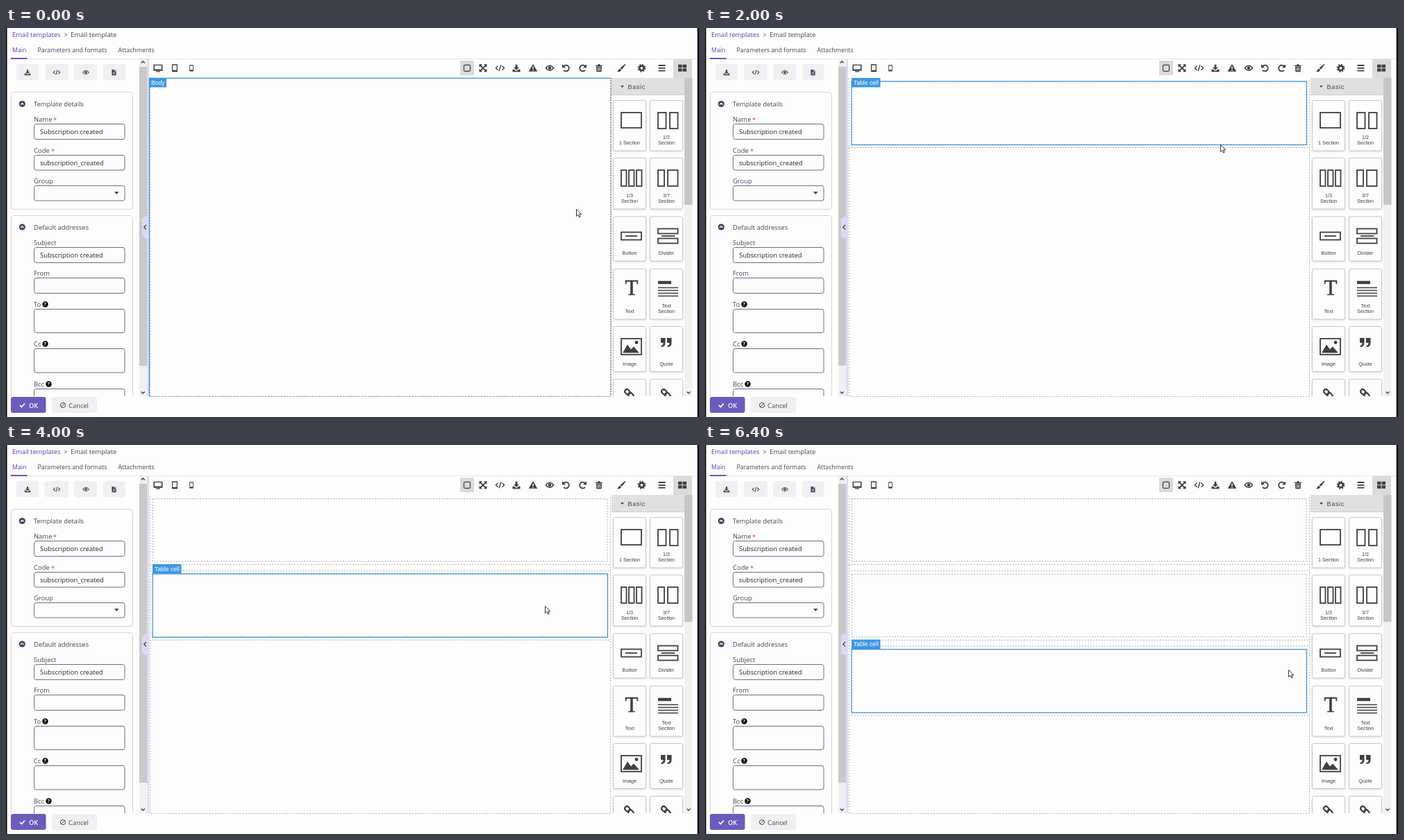
Write an HTML page that moves like this. It is 998x561 px and loops after 8000 ms.

```html
<!DOCTYPE html>
<html lang="en">
<head>
<meta charset="utf-8">
<title>Email template editor</title>
<style>
  html, body { margin: 0; width: 100%; height: 100%; overflow: hidden; background: #fdfdfd; }
  svg { display: block; width: 998px; height: 561px; }
  text { font: 9.45px "Open Sans", sans-serif; fill: #41465c; }
  .tab { font-size: 8.8px; }
  .purple { fill: #5a3fae; }
  .val { fill: #20243a; }
  .req { fill: #d8432f; }
  .btn { font-size: 9.2px; font-weight: 600; }
  .tag text { font: 8.6px "Liberation Sans", Arial, sans-serif; fill: #fff; }
  .basic { font: 9px "Liberation Sans", Arial, sans-serif; letter-spacing: .7px; fill: #444; }
  .block text { font: 7.2px "Liberation Sans", Arial, sans-serif; text-anchor: middle; fill: currentColor; }
  .block { color: #3f3f43; }
  .block.hot { color: #1f83d3; }
  .card { fill: #fdfdfd; stroke: #c8c8cb; filter: drop-shadow(0 1px 1px #0002); }
  .line { fill: none; stroke: currentColor; stroke-width: 1.8; }
  .solid { fill: currentColor; }
  .field { fill: #fdfdfd; stroke: #697086; }
  .panel { fill: none; stroke: #d3d2e3; }
  .dots { fill: none; stroke: #9b9b9b; stroke-dasharray: 1.5 2.5; }
  .blue { fill: none; stroke: #3b97e3; stroke-width: 1.2; }
  #icons, #small { color: #3e3e42; }
  #small { color: #3f4762; }
</style>
</head>
<body>
<svg viewBox="0 0 998 561">
  <defs>
    <g id="download"><path class="solid" d="M-1.4-5h2.8v4H4L0 3-4-1h2.6zM-5.5 2h2.5l2 2h2l2-2h2.5v3.5h-11z"/></g>
    <g id="code"><path class="line" style="stroke-width:1.4" d="M-3-3-6 0l3 3M3-3 6 0 3 3M1.3-4.5-1.3 4.5"/></g>
    <g id="eye"><path class="line" style="stroke-width:1.4" d="M-5.6 0Q0-7 5.6 0 0 7-5.6 0z"/><circle class="solid" r="2.3"/></g>
    <g id="file"><path class="solid" d="M-4-5h5v3h3v7.500h-8zM2-5l2 2H2z"/><path stroke="#eee" d="M-2 .5h4M-2 2.500h4"/></g>
    <g id="monitor"><path class="solid" fill-rule="evenodd" d="M-6.500-5h13v9h-13zM-5-3.700v5.500H5v-5.500zM-3 4.500h6v1.300h-6z"/></g>
    <g id="device"><path class="solid" fill-rule="evenodd" d="M-4-5.500h8v11h-8zM-2.800-4v7h5.600v-7z"/></g>
    <g id="square"><rect class="line" x="-4.500" y="-4.500" width="9" height="9" rx="1.500" style="stroke-width:1.2"/></g>
    <g id="expand"><path class="line" d="M-4-4 4 4M4-4-4 4"/><path class="solid" d="M-5.500-5.500h4.500l-4.500 4.500zM5.500-5.500v4.500L1-5.500zM5.500 5.500H1L5.500 1zM-5.500 5.500V1L-1 5.500z"/></g>
    <g id="warning"><path class="solid" d="M0-5.800 6.300 5H-6.300z"/><path stroke="#fdfdfd" stroke-width="1.500" d="M0-2v3.500M0 2.500V4"/></g>
    <g id="undo"><path class="line" d="M-3.500-2.500A4.400 4.400 0 1 1-3.500 3"/><path class="solid" d="M-5.500-5.500v5h5z"/></g>
    <g id="trash"><path class="solid" d="M-5-4h3l.8-1.500h2.400L2-4h3v1.200H-5zM-4-2.200h8l-.5 7.700h-7z"/><path stroke="#fdfdfd" stroke-width=".8" d="M-1.700-1v5M0-1v5M1.700-1v5"/></g>
    <g id="brush"><path class="solid" d="M5.800-6 6.300-5 1 2-1.500 0zM-2 .8 0 2.700Q-1 6-6 5.300-4 4-3.800 2.500z"/></g>
    <g id="gear"><circle class="line" r="3.200" style="stroke-width:2.600"/><circle class="line" r="5" style="stroke-width:1.800;stroke-dasharray:2 1.927"/></g>
    <g id="bars"><path class="line" d="M-5-3.800H5M-5 0H5M-5 3.800H5"/></g>
    <g id="grid"><path class="solid" d="M-6-5h5.500v4.500H-6zM.5-5H6v4.500H.5zM-6 .5h5.500V5H-6zM.5.500H6V5H.5z"/></g>
    <g id="up"><circle class="solid" r="4.600"/><path d="M-2.200 1 0-1.200 2.200 1" fill="none" stroke="#fff" stroke-width="1.300"/></g>
    <g id="help"><circle class="solid" r="4.200"/><text x="-2" y="2.800" style="font-size:7.500px;font-weight:700;fill:#fff">?</text></g>
    <clipPath id="left"><path d="M0 45h192v486H0z"/></clipPath>
    <clipPath id="right"><path d="M871 97h106v434H871z"/></clipPath>
  </defs>

  <path fill="#fdfdfd" d="M0 0h998v561H0z"/>
  <text class="purple" x="9" y="12.500" style="font-size:9.300px">Email templates</text>
  <text x="83.500" y="12.500">&gt;</text>
  <text x="93" y="12.500" style="font-size:9.500px">Email template</text>
  <text class="tab purple" x="9" y="35">Main</text>
  <text class="tab" x="45.500" y="35">Parameters and formats</text>
  <text class="tab" x="161.500" y="35">Attachments</text>
  <path fill="#e6e5ee" d="M2 44h994v1H2z"/>
  <path fill="#6a53b8" d="M7 43h23.500v2H7z"/>

  <g clip-path="url(#left)">
    <rect class="panel" x="7.500" y="92.500" width="175" height="169" rx="4"/>
    <rect class="panel" x="7.500" y="270.500" width="175" height="300" rx="4"/>
    <text x="40" y="113">Template details</text>
    <text x="40" y="290.500">Default addresses</text>
    <g id="form"></g>
    <path fill="#41465c" d="M156 236h6.500l-3.250 4z"/>
    <g id="small"></g>
  </g>

  <path fill="#f0f0f1" d="M192 45h11.500v486H192z"/>
  <path fill="#c9c9ca" d="M192 56h11.500v431H192z"/>
  <path fill="#dcd8f3" d="M203.500 45h2.500v486h-2.500zM196 276l4-4h5v31h-5l-4-4z"/>
  <path fill="none" stroke="#3c3c50" stroke-width="1.300" d="M202 284l-3.200 3.300 3.200 3.300M194.800 50.500l2.500-2.500 2.500 2.500M194.800 524.500l2.500 2.500 2.500-2.500"/>

  <rect x="7" y="532" width="50.500" height="23" rx="3" fill="#6c5abd"/>
  <path d="M20 544l2.500 2.500 4.500-5" fill="none" stroke="#fff" stroke-width="1.800"/>
  <text class="btn" x="33" y="547.500" style="fill:#fff">OK</text>
  <rect x="66" y="532" width="65" height="23" rx="3" fill="#f0f0f3"/>
  <path d="M79 547l6-6" stroke="#41465c"/><circle cx="82" cy="544" r="3.600" fill="none" stroke="#41465c"/>
  <text class="btn" x="90" y="547.500" style="font-weight:400;font-size:9.400px">Cancel</text>

  <path fill="#dadada" d="M654 47h20v21h-20zM961 45h27v27h-27z"/>
  <path fill="#e0e0e0" d="M872 72h105v24.500H872z"/>
  <path fill="#cfcfcf" d="M872 96h105v1H872z"/>
  <path fill="#f1f1f2" d="M977 72h11.500v459H977z"/>
  <path fill="#c6c6c7" d="M977 72h11.500v183H977z"/>
  <path fill="none" stroke="#444" stroke-width="1.300" d="M980.500 524.500l2.500 2.500 2.500-2.500"/>
  <path fill="#444" d="M885 83h5l-2.500 3z"/>
  <text class="basic" x="895.500" y="87.500">Basic</text>
  <g id="icons"></g>
  <g id="blocks" clip-path="url(#right)"></g>

  <g id="canvas">
    <path class="dots" d="M207.500 73V531.500H870.500V73"/>
    <g id="cells"></g>
    <g id="bodySel"><path class="blue" d="M871 72.300H206.500V531"/><path d="M871.200 72V531" stroke="#555" stroke-dasharray="2 1.500"/><path d="M206 531.200H871" stroke="#7fb4dd" stroke-dasharray="3 1.500"/></g>
    <rect id="cellSel" class="blue" x="211" width="655.500" height="91.500"/>
    <g id="tag" class="tag"><rect id="tagBox" height="13.500" fill="#3b97e3"/><text id="tagText" x="3" y="9.800"></text></g>
    <rect id="drop" x="206.700" y="72" width="664.300" height="459" fill="none" stroke="#f2bd62" stroke-width="1.600"/>
    <g id="mark" fill="#62b862"><path d="M208-1.200h662v2.400H208zM208-3l4.500 3-4.500 3zM870-3l-4.500 3 4.500 3z"/></g>
  </g>
  <g id="ghost" opacity=".82"></g>
  <g id="cursor">
    <path d="M.5.500v10l2.400-2.200 1.700 3.700 1.600-.8-1.600-3.500h3.200z" fill="#fff" stroke="#222" stroke-width=".9"/>
    <rect id="copy" x="2" y="10" width="7.500" height="5.500" fill="#fff" stroke="#333" stroke-dasharray="1.500 1"/>
  </g>
  <path fill="#000" d="M0 0h1.500v561H0zM995.700 0H998v561h-2.300z"/>
</svg>

<script>
const $ = id => document.getElementById(id);
const rect = (x, y, w, h, cls, rx = 0) =>
  `<rect class="${cls}" x="${x}" y="${y}" width="${w}" height="${h}" rx="${rx}"/>`;
const text = (x, y, s, cls = '') => `<text class="${cls}" x="${x}" y="${y}">${s}</text>`;
const icon = (name, x, y, more = '') => `<use href="#${name}" transform="translate(${x} ${y}) ${more}"/>`;

// Left form: label, top, height, value, mark after the label
const fields = [
  ['Name', 138, 23, 'Subscription created', '*', 68],
  ['Code', 183, 22.5, 'subscription_created', '*', 65],
  ['Group', 227, 22.5],
  ['Subject', 316, 23, 'Subscription created'],
  ['From', 360, 23],
  ['To', 405, 35, '', '?', 56.5],
  ['Cc', 462, 35.5, '', '?', 56.5],
  ['Bcc', 520, 36, '', '?', 61.5]
];
$('form').innerHTML = fields.map(([label, y, h, value, mark, mx]) =>
  text(40, y - 2.6, label) + rect(40.5, y + .5, 130.5, h - 1, 'field', 3) +
  (value ? text(49, y + 15.4, value, 'val') : '') +
  (mark === '*' ? text(mx, y - 2, '*', 'req') : mark ? icon('help', mx, y - 6.5) : '')).join('');

$('small').innerHTML = [['download', 31, 15, 32], ['code', 73, 56, 34], ['eye', 115, 98, 33], ['file', 155.5, 140, 31.5]]
  .map(([name, cx, x, w]) => `<rect x="${x}" y="52" width="${w}" height="23" rx="3" fill="#f0f0f3"/>` +
    icon(name, cx, 64, 'scale(.78)')).join('') + icon('up', 23.3, 109.5) + icon('up', 23.3, 287);

$('icons').innerHTML = [['monitor', 219], ['device', 243], ['device', 267, 'scale(.7 .85)'], ['square', 664],
  ['expand', 687], ['code', 711.5], ['download', 735], ['warning', 759], ['eye', 783], ['undo', 806.5],
  ['undo', 830.5, 'scale(-1 1)'], ['trash', 854], ['brush', 886], ['gear', 915.5], ['bars', 944.5], ['grid', 974]]
  .map(([name, x, more]) => icon(name, x, 57.8, more)).join('');

// Block pictures, relative to the card's corner
const line = (x, y, w, h) => rect(x, y, w, h, 'line');
const art = {
  one: line(12, 18, 29, 22),
  half: line(12, 18, 11.5, 23) + line(29, 18, 11.5, 23),
  third: line(12, 18, 7.5, 23) + line(23, 18, 7.5, 23) + line(34, 18, 7.5, 23),
  uneven: line(12, 18, 9, 23) + line(26, 18, 14.5, 23),
  button: line(12, 23, 29, 11) + '<path class="line" d="M18 28.500h17"/>',
  divider: line(12, 18, 28.5, 7) + line(12, 32, 28.5, 7) + '<path class="line" d="M17 28.500h19"/>',
  text: '<text x="27" y="38" style="font:31px \'Liberation Serif\',serif;stroke:currentColor;stroke-width:.6">T</text>',
  lines: '<path class="line" style="stroke-width:4.500" d="M12 20h19"/><path class="line" style="stroke-width:1.500" d="M12 27.500h29M12 31.500h29M12 35.500h29M12 39.500h29"/>',
  image: line(12, 18, 29, 23) + '<path class="solid" d="M14 38.500l7-12 5 7 4-4 8 9z"/><circle class="solid" cx="34" cy="23.500" r="2.400"/>',
  quote: '<path class="solid" d="M16 17h6.500v7q0 6-6 6v-2q3 0 3-4H16zM25 17h6.500v7q0 6-6 6v-2q3 0 3-4H25z"/>',
  link: '<g transform="translate(23 21) rotate(45)"><rect class="line" style="stroke-width:2.200" x="-7" y="-3" width="8" height="6" rx="3"/><rect class="line" style="stroke-width:2.200" x="0" y="-3" width="8" height="6" rx="3"/></g>'
};
const block = (x, y, h, pic, ...names) =>
  `<g class="block" transform="translate(${x} ${y})">` + rect(.5, .5, 47, h - 1, 'card', 2) + art[pic] +
  names.map((s, i) => text(24, h - 9.5 - (names.length - 1 - i) * 8, s)).join('') + '</g>';
const rows = [
  [104, 73.5, ['one', '1 Section'], ['half', '1/2', 'Section']],
  [187, 74.5, ['third', '1/3', 'Section'], ['uneven', '3/7', 'Section']],
  [271.5, 65, ['button', 'Button'], ['divider', 'Divider']],
  [347, 73.5, ['text', 'Text'], ['lines', 'Text', 'Section']],
  [430, 66, ['image', 'Image'], ['quote', 'Quote']],
  [506, 66, ['link', 'Link'], ['link', 'Link Block']]
];
$('blocks').innerHTML = rows.map(([y, h, a, b]) => block(874, y, h, ...a) + block(927, y, h, ...b)).join('');
$('ghost').innerHTML = block(0, 0, 73.5, 'one', '1 Section');
$('ghost').firstChild.classList.add('hot');
const firstBlock = $('blocks').firstChild;

const PITCH = 108.8;
const cellTop = i => 77 + i * PITCH;
$('cells').innerHTML = [0, 1, 2].map(i => {
  const y = cellTop(i);
  return `<g>${rect(211.5, y + .5, 654.5, 90.5, 'dots')}<path class="dots" d="M207 ${y + 95.5}H871${i ? `M207 ${y - 4.5}H871` : ''}"/></g>`;
}).join('');

// Pointer path: time, x, y
const path = [
  [0, 821, 261], [600, 895, 152], [1200, 762, 169], [1400, 742, 168], [2000, 742, 168],
  [2600, 874, 161], [2800, 892, 149], [3000, 886, 165], [3200, 856, 213], [3600, 776, 232],
  [4200, 776, 232], [4800, 913, 155], [5000, 905, 180], [5400, 848, 310], [5800, 840, 324], [8000, 840, 324]
];
// Insertion line: time, y
const marks = [[1000, 139], [1200, 139], [1400, 78], [3000, 76], [3200, 76], [3600, 172], [5000, 172], [5200, 180], [5400, 261.5], [5600, 281], [8000, 281]];
// Drags: start, end, grab point inside the card
const drags = [[800, 1600, 21, 48], [3000, 4000, 18, 45], [5000, 6000, 39, 51]];

function at(keys, t, k) {
  const i = Math.max(1, keys.findIndex(p => p[0] >= t));
  const a = keys[i - 1], b = keys[i];
  const u = Math.max(0, (t - a[0]) / (b[0] - a[0]));
  return a[k] + (b[k] - a[k]) * u;
}
const show = (el, on) => el.style.display = on ? '' : 'none';
const move = (el, x, y) => el.setAttribute('transform', `translate(${x} ${y})`);

function draw(t) {
  const x = Math.round(at(path, t, 1)), y = Math.round(at(path, t, 2));
  const drag = drags.find(d => t >= d[0] && t < d[1]);
  const count = drags.filter(d => t >= d[1]).length;
  const over = drag && x < 871;

  move($('cursor'), x, y);
  show($('copy'), drag);
  show($('ghost'), drag);
  if (drag) move($('ghost'), x - drag[2], y - drag[3]);
  firstBlock.classList.toggle('hot', !!drag || (x > 876 && y > 104 && y < 177));

  [...$('cells').children].forEach((c, i) => show(c, i < count));
  show($('drop'), over);
  show($('mark'), over);
  move($('mark'), 0, at(marks, t, 1));

  const top = cellTop(count - 1);
  show($('bodySel'), !drag && !count);
  show($('cellSel'), !drag && count);
  $('cellSel').setAttribute('y', top);
  show($('tag'), !drag);
  move($('tag'), count ? 211 : 206, count > 1 ? top - 14 : 72);
  $('tagBox').setAttribute('width', count ? 41.5 : 25);
  $('tagText').textContent = count ? 'Table cell' : 'Body';
}

function tick() {
  draw(Math.floor(performance.now() % 8000 / 200) * 200);
  requestAnimationFrame(tick);
}
tick();
</script>
</body>
</html>
```
